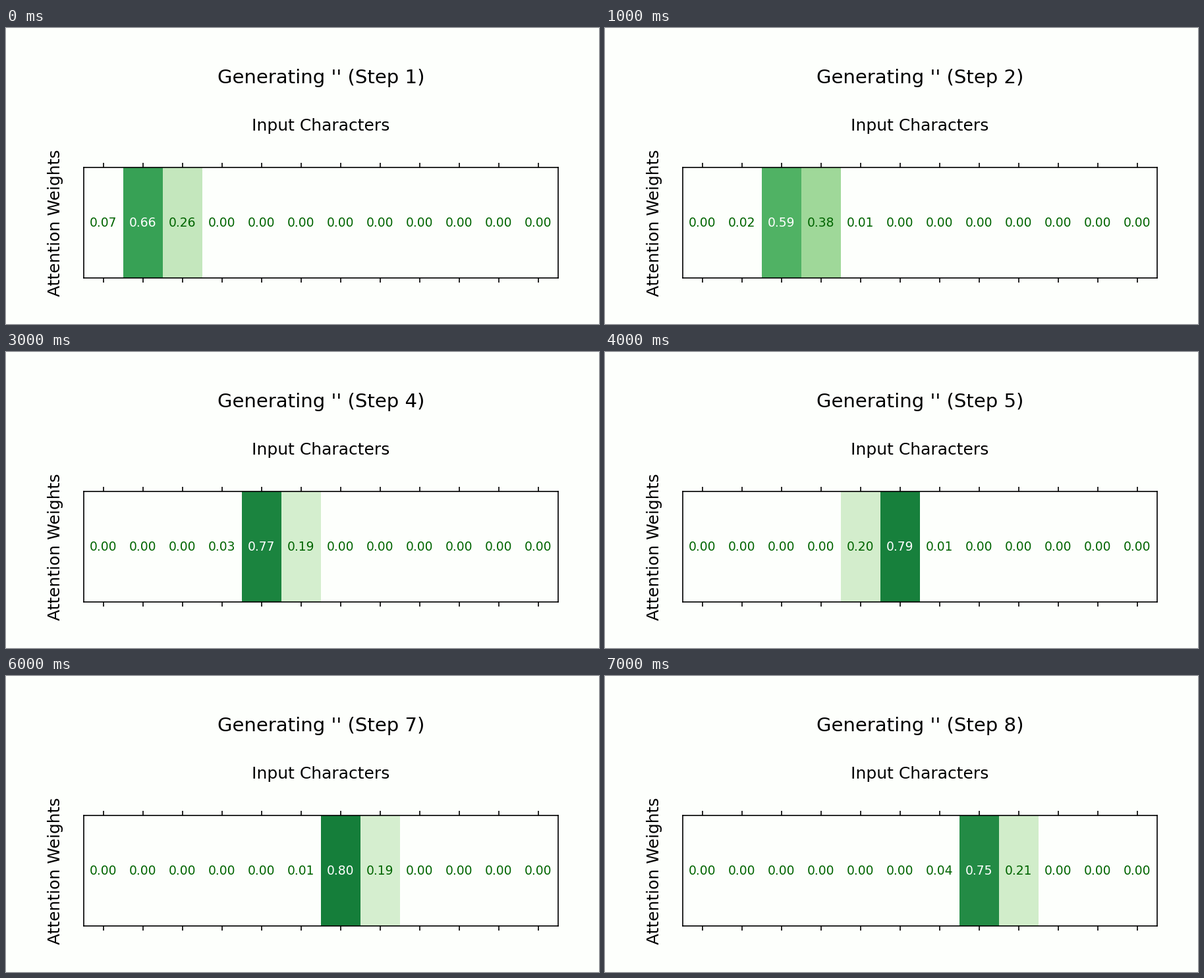
Write a matplotlib script that moves like this. It is 900 px wide and 450 px high and loops after 8 s.

```python
import matplotlib.pyplot as plt
import numpy as np
from matplotlib.animation import FuncAnimation

W, H, DPI = 900, 450, 150
PAPER = (253 / 255, 1.0, 252 / 255)
COLS = 12
LEFT, RIGHT, TOP, BOTTOM = 117.8, 837.8, 212, 380

# Attention focus per step: (column position, sharpness)
FOCUS = [(1.204, 1.57), (2.38, 1.8), (3.561, 2.15), (4.2, 2.3),
         (4.741, 2.85), (5.541, 1.82), (6.252, 2.9), (7.197, 2.1)]

plt.rcParams["font.family"] = "DejaVu Sans"
greens = plt.get_cmap("Greens")


def weights(step):
    """Softmax over the squared distance of each column to the focus."""
    center, sharpness = FOCUS[step]
    row = np.exp(-sharpness * (np.arange(COLS) - center) ** 2)
    return row / row.sum()


def cell_colors(row):
    # Faint weights are indistinguishable from the paper
    colors = greens(row)[:, :3]
    colors[row < 0.1] = PAPER
    return colors[np.newaxis]


def label(x, y, text, size, **kw):
    return fig.text(x / W, 1 - y / H, text, fontsize=size,
                    ha="center", va="baseline", **kw)


fig = plt.figure(figsize=(W / DPI, H / DPI), dpi=DPI, facecolor=PAPER)
ax = fig.add_axes([LEFT / W, 1 - BOTTOM / H,
                   (RIGHT - LEFT) / W, (BOTTOM - TOP) / H], facecolor=PAPER)
image = ax.imshow(cell_colors(weights(0)), aspect="auto",
                  interpolation="nearest")
ax.set_xticks(range(COLS))
ax.set_yticks([])
ax.tick_params(axis="x", top=True, bottom=True,
               labeltop=False, labelbottom=False)

middle = (LEFT + RIGHT) / 2
title = label(middle, 84, "", 14)
label(middle, 156, "Input Characters", 12)
label(82, (TOP + BOTTOM) / 2, "Attention Weights", 12,
      rotation=90, rotation_mode="anchor")
numbers = [ax.text(i, 0, "", fontsize=9, ha="center", va="center")
           for i in range(COLS)]


def update(step):
    row = weights(step)
    image.set_data(cell_colors(row))
    title.set_text(f"Generating '' (Step {step + 1})")
    for number, value in zip(numbers, row):
        number.set_text(f"{value:.2f}")
        number.set_color("white" if value > 0.5 else "darkgreen")
    return [image, title, *numbers]


anim = FuncAnimation(fig, update, frames=len(FOCUS), interval=1000,
                     repeat=True, repeat_delay=0)
plt.show()
```
